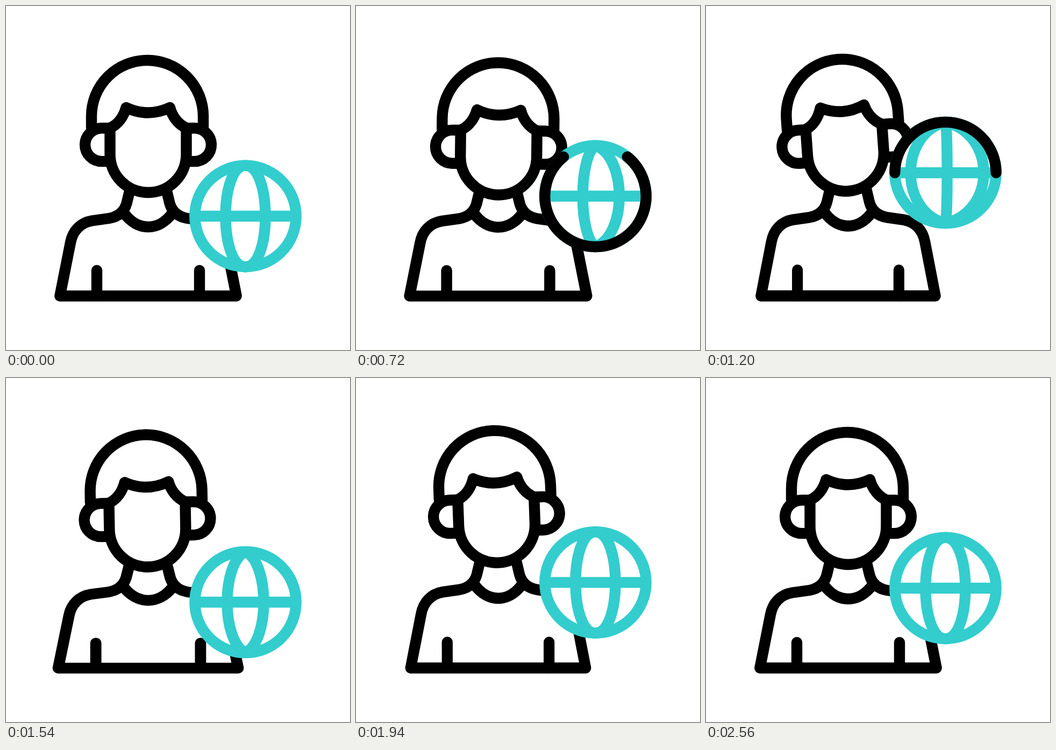
An HTML page for the animation above (2760 ms loop, 640x640 px).

```html
<!DOCTYPE html>
<html lang="en">
<head>
<meta charset="utf-8">
<title>Person with spinning globe</title>
<style>
  html, body { margin: 0; width: 100%; height: 100%; overflow: hidden; background: #fff; }
  svg { display: block; width: 100%; height: 100%; }
  path, circle { fill: none; stroke-width: 20.4; stroke-linecap: round; stroke-linejoin: round; }
  .ink { stroke: #000; }
  .teal { stroke: #33cdcd; stroke-linecap: butt; }
  .solid { fill: #fff; }
</style>
</head>
<body>
<svg viewBox="0 0 640 640">
  <g id="body" class="ink">
    <path d="M232 336L224.500 367C220 383 209 392 192 395L160 399.500C139 403 124 418 120 440L100.300 539.500H428.700L409 440C405 418 390 403 369 399.500L337 395C320 392 309 383 304.500 367L297 336"/>
    <path d="M220 386C232 402 248 411 264.500 411S297 402 309 386"/>
    <path d="M169 539V492M360 539V492"/>
  </g>
  <g id="head" class="ink">
    <path class="solid" d="M193.500 227V276A71 71 0 0 0 335.500 276V227C320 220 309 205 305 189Q264 208 223.500 189C219 205 209 220 193.500 227Z"/>
    <path d="M159 226V205A104 104 0 0 1 367 205V226"/>
    <path d="M193 227.300H178A30.900 30.900 0 0 0 178 289.100H194M336 227.300H351A30.900 30.900 0 0 1 351 289.100H335"/>
  </g>
  <g id="globe">
    <circle class="teal solid" r="94.200"/>
    <path class="teal" d="M-94 0H94"/>
    <path class="teal" id="meridians"/>
    <path class="ink" id="sweep"/>
  </g>
</svg>
<script>
const LOOP = 2760, STEP = 20, R = 94.2, GAP = 68;
const SPIN_START = 520, SPIN_END = 1545;
// Rest, crouch, leap, landing, rebound, rest.
const BEATS = [180, 440, 1010, 1630, 2010, 2560];
const $ = id => document.getElementById(id);

const progress = (t, start, end) => Math.min(1, Math.max(0, (t - start) / (end - start)));
const sine = u => (1 - Math.cos(Math.PI * u)) / 2;
const quad = u => u < .5 ? 2 * u * u : 1 - 2 * (1 - u) ** 2;

// Eases from rest through the value of each beat and back to rest.
function pose(t, crouch, leap, landing, rebound) {
  const values = [0, crouch, leap, landing, rebound, 0];
  return values.slice(1).reduce((sum, v, i) =>
    sum + (v - values[i]) * sine(progress(t, BEATS[i], BEATS[i + 1])), 0);
}

function meridian(x, bend) {
  const c = x * 4 / 3;
  return `M0 ${-R}C${c} ${-bend} ${c} ${bend} 0 ${R}`;
}

function meridians(t) {
  if (t < SPIN_START || t >= SPIN_END) return meridian(-37, R) + meridian(37, R);
  const shift = 2 * GAP * quad(progress(t, SPIN_START, SPIN_END));
  let d = '';
  for (let k = -3; k < 3; k++) {
    const x = (k + .5) * GAP + shift;
    if (Math.abs(x) < R - 10) d += meridian(x, 72);
  }
  return d;
}

// Dark ring that grows from the bottom up both sides, then clears the same way.
function sweep(t) {
  const from = Math.PI * sine(progress(t, 1000, 1400));
  const to = Math.PI * sine(progress(t, 440, 845));
  if (to - from < .001) return '';
  const point = (a, side) => `${side * R * Math.sin(a)} ${R * Math.cos(a)}`;
  const arc = side => `M${point(from, side)}A${R} ${R} 0 0 ${side < 0 ? 1 : 0} ${point(to, side)}`;
  return arc(-1) + arc(1);
}

function draw(t) {
  const squash = pose(t, .028, -.021, .022, -.011);
  const drop = pose(t, 13, -4.5, 5, -4);
  const tilt = pose(t, 5.8, -4.9, -.8, -2.2);
  const lift = pose(t, 33.5, -112, 33.5, -14.5);
  $('body').setAttribute('transform',
    `translate(264.500 549) scale(${1 + squash} ${1 - squash}) translate(-264.500 -549)`);
  $('head').setAttribute('transform', `translate(0 ${drop}) rotate(${tilt} 264 343)`);
  $('globe').setAttribute('transform', `translate(445.500 ${391 + lift})`);
  $('meridians').setAttribute('d', meridians(t));
  $('sweep').setAttribute('d', sweep(t));
}

const start = performance.now();
function tick() {
  const t = (performance.now() - start) % LOOP;
  draw(Math.floor(t / STEP) * STEP);
  requestAnimationFrame(tick);
}
tick();
</script>
</body>
</html>
```
